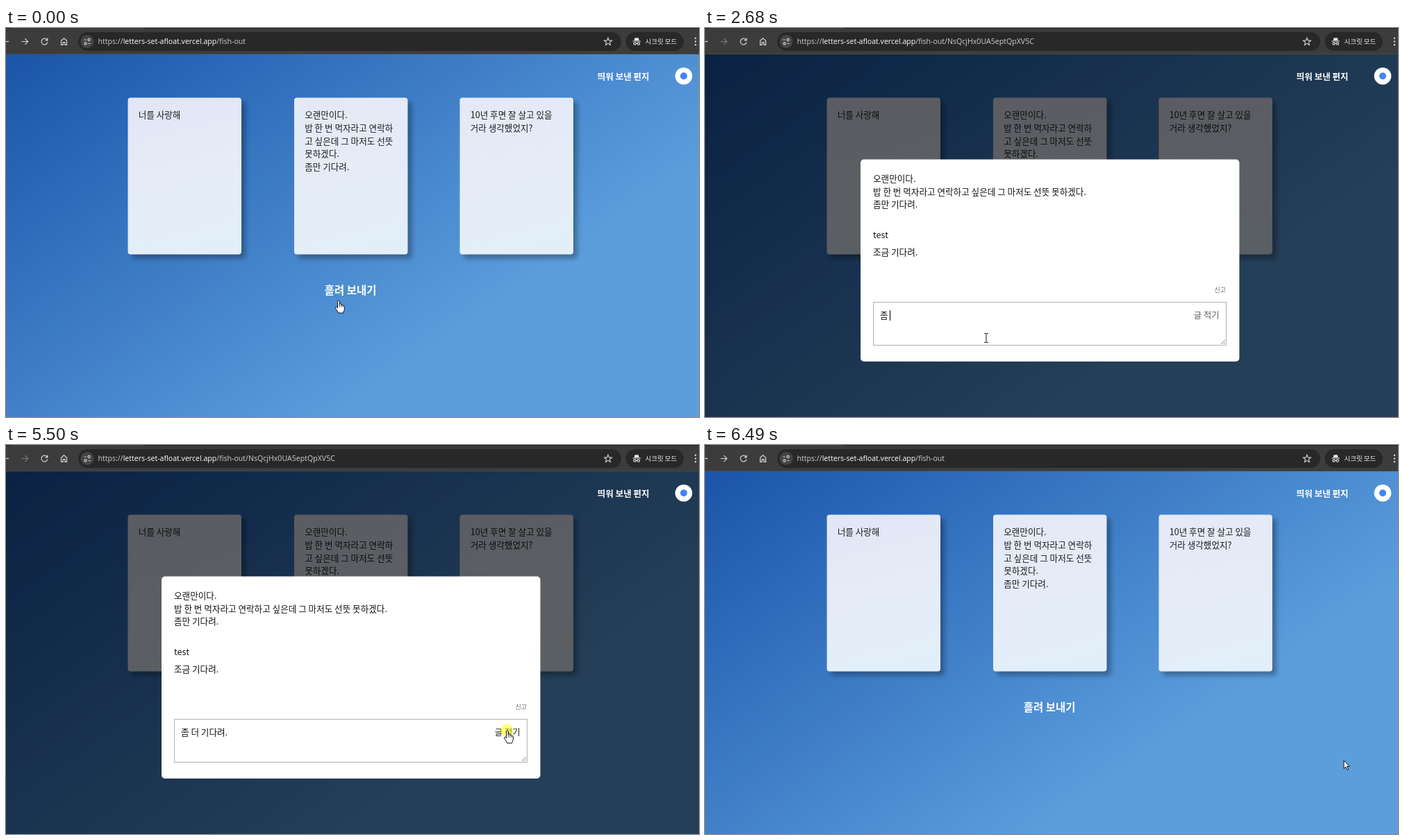
Write an HTML page with a canvas that moves like this. It is 998 px wide and 561 px high and loops after 7150 ms.

```html
<!DOCTYPE html>
<html lang="ko">
<head>
<meta charset="utf-8">
<title>띄워 보낸 편지</title>
<style>
html, body { margin: 0; width: 100%; height: 100%; overflow: hidden; background: #3c3c3c; }
canvas { display: block; }
</style>
</head>
<body>
<canvas id="stage" width="998" height="561"></canvas>
<script>
const ctx = document.getElementById('stage').getContext('2d');
const W = 998, H = 561, LOOP = 7150, TICK = 83.3, BAR = 38;
const KR = '"Noto Sans CJK KR", "Noto Sans CJK JP", sans-serif';
const UI = '"Open Sans", "Noto Sans", sans-serif';
const BODY = '12.6px ' + KR;

const OPEN = 840, POSTED = 5580, CLOSED = 6410;

const cards = [
  { x: 175.5, lines: ['너를 사랑해'] },
  { x: 415, lines: ['오랜만이다.', '밥 한 번 먹자라고 연락하', '고 싶은데 그 마저도 선뜻', '못하겠다.', '좀만 기다려.'] },
  { x: 653.5, lines: ['10년 후면 잘 살고 있을', '거라 생각했었지?'] }
];
const CARD = { y: 100.5, w: 163.5, h: 226 };

// Pointer hotspot: time, x, y
const path = [
  [0, 479, 393], [415, 517, 229], [925, 517, 230], [1170, 425, 387],
  [1260, 425, 387], [1595, 405, 447], [4190, 405, 447], [4680, 721, 410],
  [4765, 721, 410], [5010, 722, 412], [5579, 722, 412], [5580, 672, 439],
  [6159, 672, 439], [6160, 920, 455], [LOOP, 920, 455]
];
const typed = [
  [2260, 'ㅈ'], [2510, '조'], [2590, '좀'], [2680, '좀 '], [2850, '좀 더'],
  [2930, '좀 더 '], [3180, '좀 더 ㄱ'], [3350, '좀 더 기ㄷ'],
  [3520, '좀 더 기다ㄹ'], [3770, '좀 더 기다려.']
];
const caretOn = [[1590, 2000], [2260, 4100], [4600, 5100]];
const clicks = [[750, 840], [5340, 5580], [6330, 6410]];

const during = (spans, t) => spans.some(([a, b]) => t >= a && t < b);
const within = (p, x, y, w, h) => p.x >= x && p.x <= x + w && p.y >= y && p.y <= y + h;

function pointerAt(t) {
  const snap = Math.floor((t + 8) / TICK) * TICK;
  const held = t >= 5500 ? t : snap;
  let i = 0;
  while (i < path.length - 2 && path[i + 1][0] <= held) i++;
  const [t0, x0, y0] = path[i], [t1, x1, y1] = path[i + 1];
  const k = Math.min(1, Math.max(0, (held - t0) / (t1 - t0)));
  const e = k * k * (3 - 2 * k);
  return { x: x0 + (x1 - x0) * e, y: y0 + (y1 - y0) * e };
}

function text(str, x, y, font, color) {
  ctx.font = font;
  ctx.fillStyle = color;
  ctx.fillText(str, x, y);
  return x + ctx.measureText(str).width;
}

function box(x, y, w, h, r, fill) {
  ctx.beginPath();
  ctx.roundRect(x, y, w, h, r);
  ctx.fillStyle = fill;
  ctx.fill();
}

function disc(x, y, r, fill) {
  ctx.beginPath();
  ctx.arc(x, y, r, 0, Math.PI * 2);
  ctx.fillStyle = fill;
  ctx.fill();
}

function stroke(d, color, width = 1.2) {
  ctx.strokeStyle = color;
  ctx.lineWidth = width;
  ctx.stroke(new Path2D(d));
}

function drawBar(open) {
  const ink = '#d6d6d6';
  ctx.fillStyle = '#3c3c3c';
  ctx.fillRect(0, 0, W, BAR);
  ctx.fillStyle = '#1f2020';
  ctx.fillRect(0, 0, 8, 1);
  ctx.fillRect(200, 0, W - 200, 1);
  ctx.fillStyle = '#4a4a4a';
  ctx.fillRect(0, BAR - 1, W, 1);

  stroke('M0 19.5H4', ink);
  stroke('M22.5 19.5H31.5M27.3 15.2L31.6 19.5L27.3 23.8', open ? '#7c7c7c' : ink);
  stroke('M59.2 17.3A4.4 4.4 0 1 0 59.7 20.6M59.8 14.6V17.8H56.6', ink);
  stroke('M79.5 18.2L83.5 14.8L87.5 18.2V24.3H84.9V20.6H82.1V24.3H79.5Z', ink);

  box(104, 6, 782, 27, 13.5, '#282828');
  disc(117, 19.5, 9.5, '#454545');
  stroke('M112.5 17H115.5M118.5 22.5H121.5', ink, 1.1);
  ctx.beginPath();
  ctx.arc(119.5, 17, 1.6, 0, 7);
  ctx.moveTo(116.1, 22.5);
  ctx.arc(114.5, 22.5, 1.6, 0, 7);
  ctx.stroke();

  const url = '10.6px ' + UI;
  let x = text('https://', 132.5, 23.3, url, '#cfcfcf');
  x = text('letters-set-afloat.vercel.app', x, 23.3, url, '#ffffff');
  text('/fish-out' + (open ? '/NsQcjHx0UA5eptQpXV5C' : ''), x, 23.3, url, '#cfcfcf');

  ctx.beginPath();
  for (let i = 0; i < 10; i++) {
    const r = i % 2 ? 2.5 : 5.8, a = i * Math.PI / 5 - Math.PI / 2;
    ctx.lineTo(867 + r * Math.cos(a), 19.9 + r * Math.sin(a));
  }
  ctx.closePath();
  ctx.lineWidth = 1.1;
  ctx.stroke();

  box(892.5, 6, 83.5, 27, 13.5, '#282828');
  ctx.fillStyle = '#e8e8e8';
  ctx.fill(new Path2D('M904.6 18L905.6 14.2H910.8L911.8 18Z'));
  stroke('M902.5 19H914M907.3 22.3H909.2', '#e8e8e8', 1.1);
  ctx.beginPath();
  ctx.arc(905.6, 22.6, 1.7, 0, 7);
  ctx.moveTo(912.6, 22.6);
  ctx.arc(910.9, 22.6, 1.7, 0, 7);
  ctx.stroke();
  text('시크릿 모드', 920.5, 22.8, '9.5px ' + KR, '#f0f0f0');
  for (const y of [14.8, 19.5, 24.2]) disc(993, y, 1.2, ink);
}

function drawCard(card, hover) {
  const { y, w, h } = CARD;
  const fill = ctx.createLinearGradient(card.x, y, card.x + 60, y + h);
  fill.addColorStop(0, card.x < 200 ? '#e0e6f4' : '#e4e9f6');
  fill.addColorStop(0.5, '#e5ebf7');
  fill.addColorStop(1, '#e3eff8');
  ctx.save();
  ctx.shadowColor = `rgba(0,0,0,${hover ? 0.5 : 0.3})`;
  ctx.shadowOffsetX = ctx.shadowOffsetY = 6;
  ctx.shadowBlur = hover ? 9 : 7;
  box(card.x, y, w, h, 4, fill);
  ctx.restore();
  card.lines.forEach((s, i) => text(s, card.x + 15.2, 130.3 + i * 18.7, BODY, '#1c1c20'));
}

function drawPage(open, p) {
  // 145 degree gradient that levels off at about 70%
  const sky = ctx.createLinearGradient(0, BAR, 574, BAR + 819);
  sky.addColorStop(0, '#1b54a8');
  sky.addColorStop(0.2, '#2c69b9');
  sky.addColorStop(0.71, '#5c9edc');
  ctx.fillStyle = sky;
  ctx.fillRect(0, BAR, W, H - BAR);
  for (const c of cards) drawCard(c, !open && within(p, c.x, CARD.y, CARD.w, CARD.h));
  text('흘려 보내기', 458.8, 384.3, 'bold 15.5px ' + KR, '#ffffff');
  if (open) {
    ctx.fillStyle = 'rgba(0,0,0,0.6)';
    ctx.fillRect(0, BAR, W, H - BAR);
  }
  text('띄워 보낸 편지', 851.8, 74.5, 'bold 12.5px ' + KR, '#ffffff');
  disc(976, 69.3, 12.3, '#ffffff');
  disc(976, 69.3, 5, '#4285f4');
}

function drawModal(t, p) {
  const posted = t >= POSTED;
  const top = posted ? 177 : 189.5, h = posted ? 316 : 291.5;
  const foot = top + h;
  box(224, top, 545.5, h, 5, '#ffffff');
  const line = (s, y) => text(s, 242, top + y, BODY, '#141414');
  line('오랜만이다.', 32.5);
  line('밥 한 번 먹자라고 연락하고 싶은데 그 마저도 선뜻 못하겠다.', 51.2);
  line('좀만 기다려.', 69.9);
  line('test', 113.8);
  const replies = posted ? ['좀 더 기다려.', '조금 기다려.'] : ['조금 기다려.'];
  replies.forEach((s, i) => line(s, 138.8 + i * 25));
  text('신고', 733.5, foot - 99.7, '9.1px ' + KR, '#6e6e6e');

  const area = Math.round(foot - 86) + 0.5;
  ctx.strokeStyle = '#b2b2b2';
  ctx.lineWidth = 1;
  ctx.strokeRect(242.5, area, 508, 62);
  stroke(`M743 ${area + 60.5}L749 ${area + 54.5}M746.5 ${area + 60.5}L749 ${area + 58}`, '#777', 0.9);

  const hot = within(p, 702, area + 8, 40, 22);
  text('글 적기', 703.8, foot - 62.3, '500 12.4px ' + KR, hot ? '#222222' : '#626262');

  if (posted) return;
  const entry = typed.filter(([at]) => t >= at).pop();
  const end = text(entry ? entry[1] : '', 252, foot - 62.5, BODY, '#141414');
  if (during(caretOn, t)) {
    ctx.fillStyle = '#000';
    ctx.fillRect(Math.round(end) + (entry ? 0 : 1), 407, 1, 15);
  }
}

function pointerKind(p, open, posted) {
  if (!open) {
    const onCard = cards.some(c => within(p, c.x, CARD.y, CARD.w, CARD.h));
    return onCard || within(p, 455, 363, 82, 35) ? 'hand' : 'arrow';
  }
  const area = posted ? 407 : 395;
  if (within(p, 702, area + 8, 40, 22)) return 'hand';
  const onText = within(p, 242, posted ? 195 : 208, 508, 56);
  return onText || within(p, 242, area, 508, 62) ? 'beam' : 'arrow';
}

const hand = new Path2D('M-1.4 1.2C-1.4-.5 1.3-.5 1.3 1.2V6.2C2-0 3.9 5.8 3.9 7C4.6 5.9 6.2 6.4 6.3 7.6C7.1 6.9 8.4 7.3 8.4 8.8V12C8.4 14.5 6.9 15.5 6.7 18H-.2C-.8 15.4-3.9 13-4.5 10.6C-4.9 9-3.2 8.5-2.3 9.8L-1.4 11Z');
const arrow = new Path2D('M0 0V11.6L2.7 9.1L4.7 13.6L6.6 12.7L4.6 8.4H8.2Z');
const beam = new Path2D('M-2.8-6.5H-.8L0-5.8L.8-6.5H2.8M0-5.8V5.8M-2.8 6.5H-.8L0 5.8L.8 6.5H2.8');

function drawPointer(p, kind) {
  ctx.save();
  ctx.translate(p.x, p.y);
  ctx.lineJoin = 'round';
  ctx.strokeStyle = '#111';
  ctx.lineWidth = 1;
  if (kind === 'beam') {
    ctx.stroke(beam);
  } else {
    const shape = kind === 'hand' ? hand : arrow;
    ctx.fillStyle = '#fff';
    ctx.fill(shape);
    ctx.stroke(shape);
    if (kind === 'hand') stroke('M1.3 6V9.5M3.9 7V9.5M6.3 7.6V9.8', '#111', 0.8);
  }
  ctx.restore();
}

function render(t) {
  const p = pointerAt(t);
  const open = t >= OPEN && t < CLOSED;
  drawPage(open, p);
  drawBar(open);
  if (open) drawModal(t, p);
  if (during(clicks, t)) disc(p.x - 0.7, p.y - 0.5, 9.3, 'rgba(255,255,0,0.5)');
  drawPointer(p, pointerKind(p, open, t >= POSTED));
}

const start = performance.now();
function frame() {
  render((performance.now() - start) % LOOP);
  requestAnimationFrame(frame);
}
frame();
</script>
</body>
</html>
```
